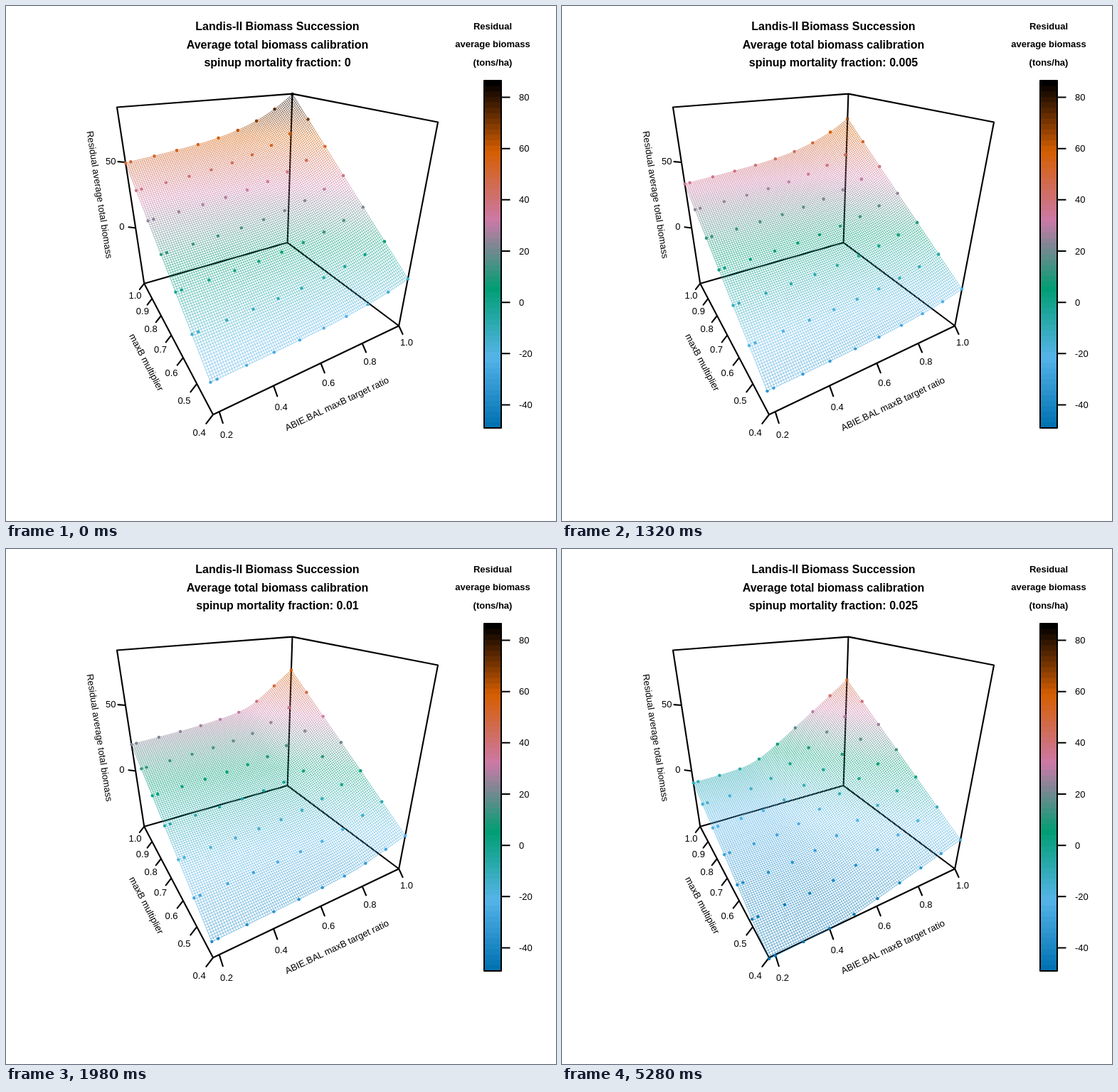
Animation of 773x725 px, one loop 6.6 s. Source, as an HTML page with a canvas:

```html
<!DOCTYPE html>
<html lang="en">
<head>
<meta charset="utf-8">
<title>Biomass calibration surface</title>
<style>
  html, body { margin: 0; width: 100%; height: 100%; overflow: hidden; background: #fff; }
  canvas, svg { position: absolute; left: 0; top: 0; width: 773px; height: 725px; }
  text { font: 13px "Liberation Sans", Arial, Helvetica, sans-serif; fill: #000; }
  .title { font-size: 16px; font-weight: bold; }
  .key { font-weight: bold; }
  .mid { text-anchor: middle; }
</style>
</head>
<body>
<canvas id="plot" width="773" height="725"></canvas>
<svg id="labels" viewBox="0 0 773 725"></svg>
<script>
const STEP = 660, LOOP = 6600;
const W = 773, H = 725;
const Z_MIN = -49, Z_MAX = 86.5;
const X_MIN = 0.179, Y_MIN = 0.4;
const TARGET = 76.5;
const GRID = 99;
const fractions = ["0", "0.001", "0.005", "0.01", "0.018", "0.025"];

const ctx = document.getElementById("plot").getContext("2d");
const svg = document.getElementById("labels");

const range = (from, to, step) =>
  Array.from({ length: Math.round((to - from) / step) + 1 }, (_, i) => from + i * step);

// Biomass at ratio x and spinup mortality m: a decaying curve that blends into a steep line
function biomass(x, m) {
  const u = (x - X_MIN) / (1 - X_MIN);
  const base = (126 + 14 * u + 22.8 * u ** 3.7) * Math.exp(-25.5 * m);
  const ramp = 142 - 550 * m - 112 * (1 - x);
  const soft = 0.2 + 160 * m;
  return base + soft * Math.log1p(Math.exp((ramp - base) / soft));
}
const residual = (x, y, m) => y * biomass(x, m) - TARGET;

// Colour scale
const ramp = [[0, 114, 178], [86, 180, 233], [0, 158, 115], [204, 121, 167], [213, 94, 0], [0, 0, 0]];
const BINS = 64;
const colors = Array.from({ length: BINS }, (_, i) => {
  const p = i / (BINS - 1) * (ramp.length - 1);
  const k = Math.min(Math.floor(p), ramp.length - 2);
  return `rgb(${ramp[k].map((c, j) => Math.round(c + (ramp[k + 1][j] - c) * (p - k)))})`;
});
const bin = v => Math.max(0, Math.min(BINS - 1, Math.floor((v - Z_MIN) / (Z_MAX - Z_MIN) * BINS)));

// Perspective view of the cube [-1, 1]^3
const rad = Math.PI / 180;
const sinT = Math.sin(30 * rad), cosT = Math.cos(30 * rad);
const sinP = Math.sin(25 * rad), cosP = Math.cos(25 * rad);
const DIST = Math.sqrt(3) + 2, ZOOM = 540.9, CX = 358.9, CY = 300.1;

function project(x, y, z) {
  const along = sinT * x + cosT * y;
  const k = ZOOM / (DIST + cosP * along - sinP * z);
  return [CX + k * (cosT * x - sinT * y), CY - k * (sinP * along + cosP * z)];
}
const norm = (v, lo, hi) => 2 * (v - lo) / (hi - lo) - 1;
const nx = v => norm(v, X_MIN, 1);
const ny = v => norm(v, Y_MIN, 1);
const nz = v => norm(v, Z_MIN, Z_MAX);
const place = (x, y, z) => project(nx(x), ny(y), nz(z));

function line(a, b) {
  ctx.moveTo(a[0], a[1]);
  ctx.lineTo(b[0], b[1]);
}

function addText(str, x, y, cls, angle) {
  const el = document.createElementNS("http://www.w3.org/2000/svg", "text");
  el.textContent = str;
  el.setAttribute("class", cls);
  if (angle === undefined) {
    el.setAttribute("x", x);
    el.setAttribute("y", y);
  } else {
    el.setAttribute("transform", `translate(${x} ${y}) rotate(${angle})`);
    el.setAttribute("y", 4.6);
  }
  svg.appendChild(el);
  return el;
}

// Axis ticks: [label, anchor in the cube, outward direction]
const ticks = [
  ...range(0.2, 1, 0.2).map(v => [v.toFixed(1), [nx(v), -1, -1], [0, -1, -1]]),
  ...range(0.4, 1, 0.1).map(v => [v.toFixed(1), [-1, ny(v), -1], [-1, 0, -1]]),
  ...range(0, 50, 50).map(v => [String(v), [-1, 1, nz(v)], [-1, 1, 0]])
];
const offset = (p, dir, d) => project(...p.map((c, i) => c + dir[i] * d));

const bar = { x: 672, y: 105, w: 24, h: 489 };
const barY = v => bar.y + bar.h * (Z_MAX - v) / (Z_MAX - Z_MIN);
const barTicks = range(-40, 80, 20);

// Floor, three uprights and the two back edges of the lid
function drawFrame() {
  const left = [-1, 1], front = [-1, -1], right = [1, -1], back = [1, 1];
  const at = (corner, z) => project(...corner, z);
  ctx.strokeStyle = "#000";
  ctx.lineWidth = 2.1;
  ctx.lineCap = ctx.lineJoin = "round";
  ctx.beginPath();
  [left, front, right, back].forEach((c, i, all) => line(at(c, -1), at(all[(i + 1) % 4], -1)));
  for (const c of [left, back, right]) line(at(c, -1), at(c, 1));
  for (const c of [left, right]) line(at(c, 1), at(back, 1));
  for (const [, p, dir] of ticks) line(project(...p), offset(p, dir, 0.06));
  ctx.stroke();
}

function drawBar() {
  const step = bar.h / BINS;
  for (let i = 0; i < BINS; i++) {
    const top = bar.y + i * step;
    ctx.fillStyle = colors[BINS - 1 - i];
    ctx.fillRect(bar.x, top, bar.w, bar.y + bar.h - top);
  }
  ctx.strokeStyle = "#000";
  ctx.lineWidth = 2;
  ctx.beginPath();
  ctx.rect(bar.x, bar.y, bar.w, bar.h);
  for (const v of barTicks) line([bar.x + bar.w, barY(v)], [708.5, barY(v)]);
  ctx.stroke();
}

function drawMesh(m) {
  const nodes = range(0, GRID, 1).map(i => {
    const x = X_MIN + (1 - X_MIN) * i / GRID;
    return range(0, GRID, 1).map(j => {
      const y = Y_MIN + (1 - Y_MIN) * j / GRID, v = residual(x, y, m);
      return { v, p: place(x, y, v) };
    });
  });
  const groups = colors.map(() => []);
  const link = (a, b) => groups[bin((a.v + b.v) / 2)].push([a.p, b.p]);
  for (let i = 0; i <= GRID; i++) {
    for (let j = 0; j <= GRID; j++) {
      if (i < GRID) link(nodes[i][j], nodes[i + 1][j]);
      if (j < GRID) link(nodes[i][j], nodes[i][j + 1]);
    }
  }
  ctx.lineWidth = 0.55;
  ctx.lineCap = "butt";
  groups.forEach((segs, k) => {
    ctx.strokeStyle = colors[k];
    ctx.beginPath();
    for (const [a, b] of segs) line(a, b);
    ctx.stroke();
  });
}

function drawDots(m) {
  for (const y of range(0.4, 1, 0.1)) {
    for (const x of [X_MIN, ...range(0.2, 1, 0.1)]) {
      const v = residual(x, y, m);
      ctx.fillStyle = colors[bin(v)];
      ctx.beginPath();
      ctx.arc(...place(x, y, v), 2.2, 0, 2 * Math.PI);
      ctx.fill();
    }
  }
}

addText("Landis-II Biomass Succession", 381.5, 33.7, "title mid");
addText("Average total biomass calibration", 381.5, 59.5, "title mid");
const runTitle = addText("", 381.5, 85.2, "title mid");
["Residual", "average biomass", "(tons/ha)"].forEach((s, i) => addText(s, 684, 32.5 + i * 25.8, "key mid"));
for (const [s, p, dir] of ticks) {
  const [x, y] = offset(p, dir, 0.12);
  addText(s, x, y + 4.6, "mid");
}
for (const v of barTicks) addText(v, 721, barY(v) + 4.6, "");
addText("ABIE.BAL maxB target ratio", 465, 560, "mid", -25.5);
addText("maxB multiplier", 197.5, 501.5, "mid", 62.3);
addText("Residual average total biomass", 131.7, 265.7, "mid", 81.3);

let shown = -1;
function tick() {
  const t = performance.now() % LOOP;
  const i = Math.min(fractions.length - 1, Math.floor(t / STEP));
  if (i !== shown) {
    shown = i;
    const m = Number(fractions[i]);
    runTitle.textContent = "spinup mortality fraction: " + fractions[i];
    ctx.clearRect(0, 0, W, H);
    drawFrame();
    drawMesh(m);
    drawDots(m);
    drawBar();
  }
  requestAnimationFrame(tick);
}
tick();
</script>
</body>
</html>
```
